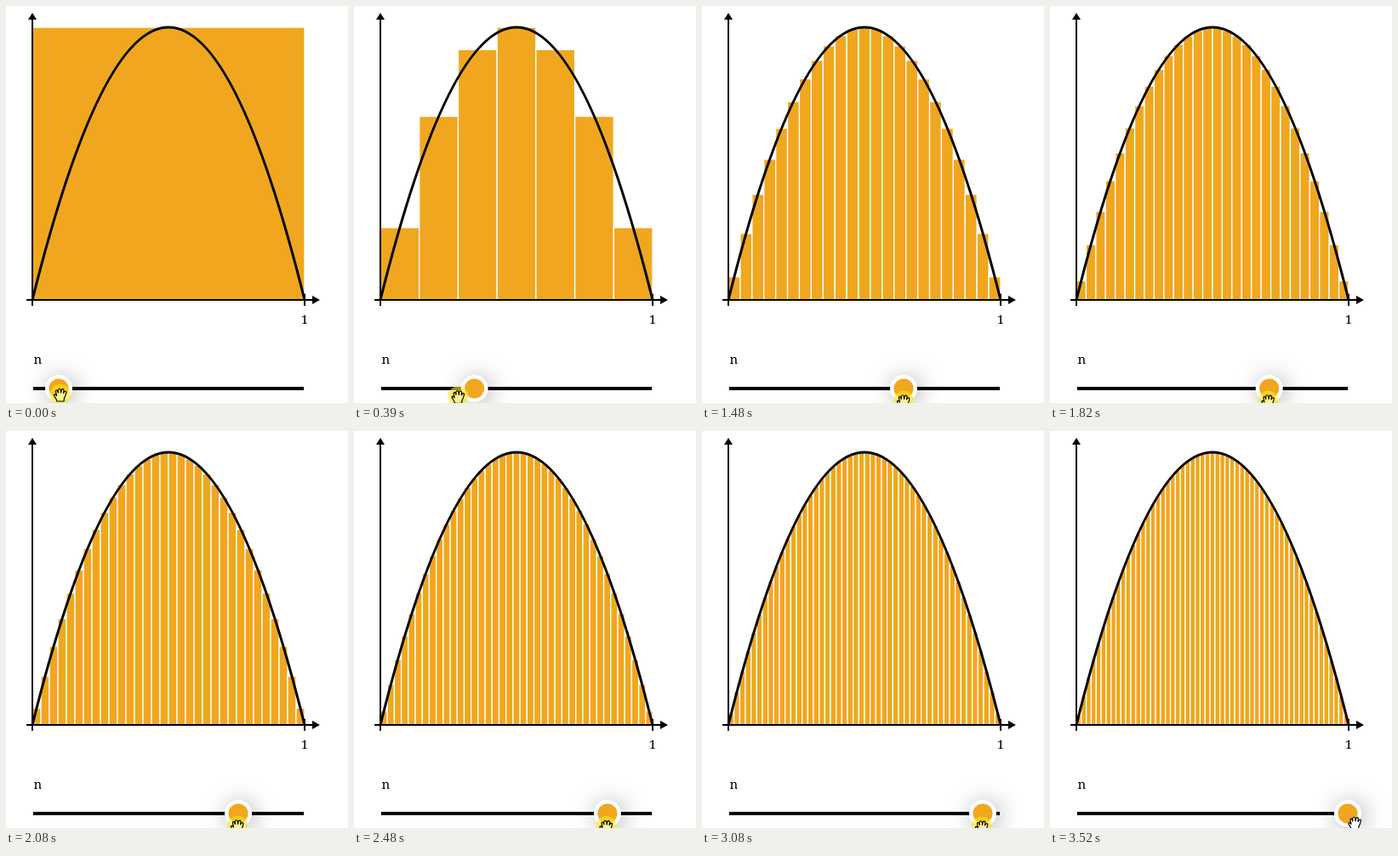
Write an HTML page with a canvas that moves like this. It is 402 px wide and 466 px high and loops after 3590 ms.

```html
<!DOCTYPE html>
<html lang="en">
<head>
<meta charset="utf-8">
<title>Midpoint rectangles under a parabola</title>
<style>
html, body { margin: 0; overflow: hidden; background: #fff; }
canvas { display: block; }
</style>
</head>
<body>
<canvas id="stage" width="402" height="466"></canvas>
<script>
const ctx = document.getElementById('stage').getContext('2d');
const LOOP = 3590, ORANGE = '#f0a71f';
const LEFT = 31, BASE = 345, SIZE = 320;
const TRACK_X = 32, TRACK_Y = 449, TRACK_LEN = 318;

// time in ms, step, knob x, hand x, hand y
const keys = [
  [0, 0, 62, 64, 456],
  [860, 13, 190, 191, 461],
  [1480, 22, 237, 237, 463.5],
  [2080, 31, 273, 272, 463.5],
  [2810, 42, 317, 317, 464.5],
  [3080, 46, 330, 329, 464.5],
  [3520, 53, 350, 358.5, 460]
];
const hand = new Path2D('M-4 8C-5 4-8 2-7.5 .5C-7-1-5.5 0-4.5 1.5L-5.5-3.5Q-5.5-5.7-3.5-4.5L-2.7-2V-5.5' +
  'Q-1.2-8 .3-5.5L.6-2L1.3-5.7Q3-7.5 4-5L3.5-1.5L5-3.5Q7.2-4.2 6.8-2Q6 2 4.5 4L4 8Z');

const mix = (a, b, u) => a + (b - a) * u;

// The screen advances in discrete steps; the squared slider position is linear in them.
function pose(time) {
  let i = 0;
  while (i < keys.length - 2 && time >= keys[i + 1][0]) i++;
  const a = keys[i], b = keys[i + 1];
  const u = Math.min(1, (time - a[0]) / (b[0] - a[0]));
  const step = Math.min(b[1], Math.floor(mix(a[1], b[1], u) + 0.2));
  const w = (step - a[1]) / (b[1] - a[1]);
  const square = x => ((x - TRACK_X) / TRACK_LEN) ** 2;
  const v = mix(square(a[2]), square(b[2]), w);
  return {
    n: Math.round(1 + 54 * v),
    knob: TRACK_X + TRACK_LEN * Math.sqrt(v),
    handX: mix(a[3], b[3], w),
    handY: mix(a[4], b[4], w),
    pressed: step < 53
  };
}

function line(x1, y1, x2, y2, width) {
  ctx.lineWidth = width;
  ctx.beginPath();
  ctx.moveTo(x1, y1);
  ctx.lineTo(x2, y2);
  ctx.stroke();
}

function disc(x, y, r, color) {
  ctx.fillStyle = color;
  ctx.beginPath();
  ctx.arc(x, y, r, 0, 2 * Math.PI);
  ctx.fill();
}

function triangle(...p) {
  ctx.beginPath();
  ctx.moveTo(p[0], p[1]);
  ctx.lineTo(p[2], p[3]);
  ctx.lineTo(p[4], p[5]);
  ctx.fill();
}

function drawBars(n) {
  const w = SIZE / n;
  ctx.fillStyle = ORANGE;
  ctx.strokeStyle = '#fff';
  ctx.lineWidth = 1.3;
  for (let i = 0; i < n; i++) {
    const x = (i + 0.5) / n, h = 4 * x * (1 - x) * SIZE;
    ctx.fillRect(LEFT + i * w, BASE - h, w, h);
    ctx.strokeRect(LEFT + i * w, BASE - h, w, h);
  }
}

function drawAxes() {
  ctx.strokeStyle = ctx.fillStyle = '#000';
  line(LEFT, 352, LEFT, 12, 2);
  line(24, BASE, 364, BASE, 2);
  line(LEFT + SIZE, 338, LEFT + SIZE, 352, 2);
  triangle(31, 8, 26, 16, 36, 16);
  triangle(369, 345, 360, 340, 360, 350);
  ctx.lineWidth = 3;
  ctx.beginPath();
  ctx.moveTo(LEFT, BASE);
  ctx.quadraticCurveTo(LEFT + SIZE / 2, BASE - 2 * SIZE, LEFT + SIZE, BASE);
  ctx.stroke();
  ctx.font = '15px "Noto Serif", serif';
  ctx.textAlign = 'center';
  ctx.fillText('1', 351, 373);
  ctx.textAlign = 'left';
  ctx.fillText('n', 32.5, 420);
}

function drawSlider(p) {
  ctx.strokeStyle = '#000';
  line(TRACK_X, TRACK_Y, TRACK_X + TRACK_LEN, TRACK_Y, 4);
  ctx.save();
  ctx.shadowColor = 'rgba(0,0,0,.35)';
  ctx.shadowBlur = 28;
  ctx.shadowOffsetX = ctx.shadowOffsetY = 3;
  disc(p.knob, TRACK_Y, 16, '#fff');
  ctx.restore();
  disc(p.knob, TRACK_Y, 11.5, ORANGE);

  if (p.pressed) disc(p.handX, p.handY, 12, 'rgba(255,232,30,.6)');
  ctx.save();
  ctx.translate(p.handX, p.handY);
  ctx.fillStyle = p.pressed ? '#fff48c' : '#fff';
  ctx.lineWidth = 1.2;
  ctx.lineJoin = 'round';
  ctx.fill(hand);
  ctx.stroke(hand);
  ctx.restore();
}

function draw() {
  const p = pose(performance.now() % LOOP);
  ctx.fillStyle = '#fff';
  ctx.fillRect(0, 0, 402, 466);
  drawBars(p.n);
  drawAxes();
  drawSlider(p);
  requestAnimationFrame(draw);
}
draw();
</script>
</body>
</html>
```
